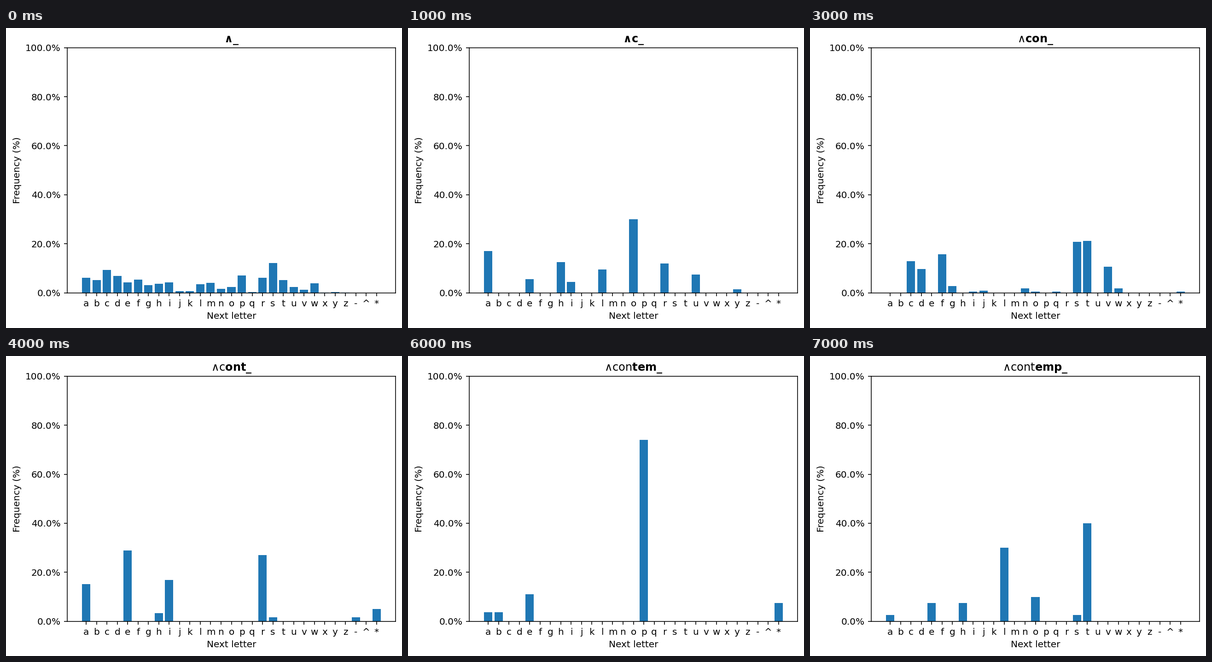
Animation of 860 by 651 pixels, one loop 8000 ms. Source, as a matplotlib script:

```python
import matplotlib.pyplot as plt
from matplotlib.animation import FuncAnimation

W, H, DPI = 860, 651, 144
LETTERS = "abcdefghijklmnopqrstuvwxyz-^*"
WORD = "∧contemp"
CONTEXT = 3  # letters of the prefix that predict the next one

# Weight of each next letter, one entry per typed prefix
WEIGHTS = [
    dict(a=6.2, b=5.15, c=9.3, d=6.85, e=4.25, f=5.35, g=3.2, h=3.65, i=4.2,
         j=.75, k=.65, l=3.45, m=4.05, n=1.6, o=2.3, p=7.05, q=.35, r=6.1,
         s=12.1, t=5.15, u=2.45, v=1.35, w=3.9, x=.05, y=.35, z=.05),
    dict(a=17, e=5.5, h=12.5, i=4.5, l=9.5, o=30, r=12, u=7.5, y=1.5),
    dict(a=3.8, c=1.4, d=.65, e=.2, f=.9, g=.65, h=.2, i=1.4, l=2.65,
         m=24.6, n=41.8, o=1.4, p=1.6, q=.45, r=5.15, s=.65, t=.45,
         u=10.2, v=.9, w=.9) | {"*": .2},
    dict(c=28, d=21, f=34, g=6, i=1, j=2, n=4, o=1, q=1,
         s=45, t=46, v=23, w=4) | {"*": 1},
    dict(a=9, e=17, h=2, i=10, r=16, s=1) | {"-": 1, "*": 3},
    dict(c=2, d=12, g=4, l=5, m=4, n=16, r=42, s=7, x=3) | {"*": 5},
    dict(a=1, b=1, e=3, p=20) | {"*": 2},
    dict(a=1, e=3, h=3, l=12, o=4, s=1, t=16),
]

fig = plt.figure(figsize=(W / DPI, H / DPI), dpi=DPI, facecolor="white")
ax = fig.add_axes([0.15, 0.12, 0.83, 0.81])
bars = ax.bar(range(len(LETTERS)), [0] * len(LETTERS), color="#1f77b4")
ax.set_xlim(-1.84, len(LETTERS) + 0.84)
ax.set_ylim(0, 1)
ax.set_xticks(range(len(LETTERS)), list(LETTERS))
ax.yaxis.set_major_formatter(lambda v, _: f"{v:.1%}")
ax.set_xlabel("Next letter")
ax.set_ylabel("Frequency (%)")


def place_axes(bottom):
    left, width, height = 132.8, 713.4, 532.1
    ax.set_position([left / W, 1 - bottom / H, width / W, height / H])


def draw(step):
    prefix = WORD[:step + 1]
    # A tall "t" in the title pushes the plot down a little
    place_axes(575.8 if "t" in prefix else 574.7)
    plain, bold = prefix[:-CONTEXT], prefix[-CONTEXT:]
    ax.set_title(plain + r"$\mathbf{" + bold + r"\_}$")
    weights = WEIGHTS[step]
    total = sum(weights.values())
    for bar, letter in zip(bars, LETTERS):
        bar.set_height(weights.get(letter, 0) / total)
    return list(bars)


anim = FuncAnimation(fig, draw, frames=len(WORD), interval=1000,
                     repeat=True, repeat_delay=0)
plt.show()
```
